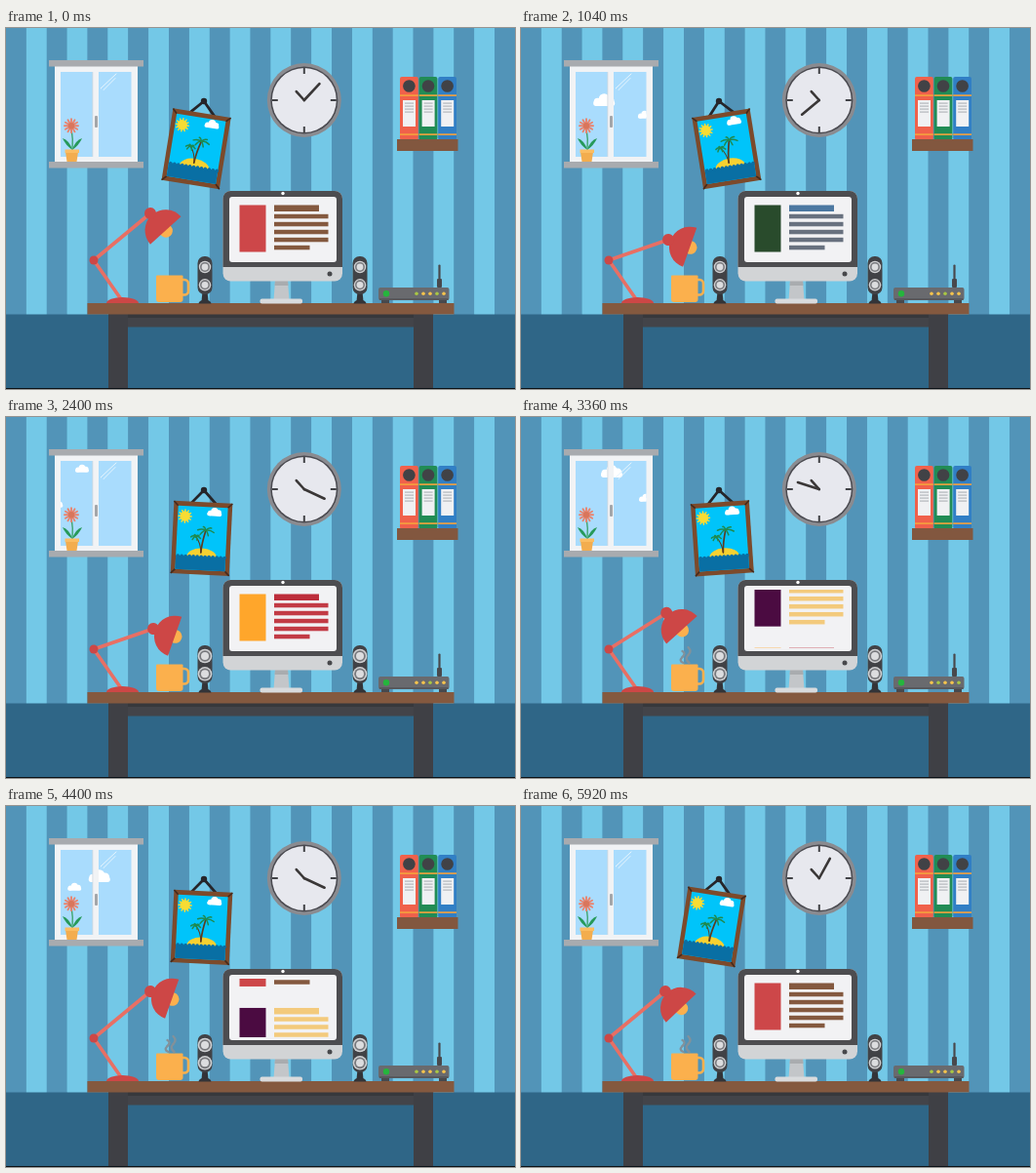
Recreate the animation shown at these times as an HTML page with a canvas. Size 522 by 370 pixels, loop 6000 ms.

```html
<!DOCTYPE html>
<html lang="en">
<head>
<meta charset="utf-8">
<title>Desk</title>
<style>
html, body { margin: 0; width: 100%; height: 100%; overflow: hidden; background: #5294b8; }
canvas { display: block; }
</style>
</head>
<body>
<canvas id="stage" width="522" height="370"></canvas>
<script>
const c = document.getElementById('stage').getContext('2d');
const LOOP = 6000, STEP = 80, SWING = 2000, TAU = Math.PI * 2, RAD = Math.PI / 180;
const DARK = '#414246', BROWN = '#84593f', RED = '#cd4746', PINK = '#e86f64';

function rect(x, y, w, h, fill) { c.fillStyle = fill; c.fillRect(x, y, w, h); }
function round(x, y, w, h, r, fill) {
  c.fillStyle = fill; c.beginPath(); c.roundRect(x, y, w, h, r); c.fill();
}
function disc(x, y, r, fill, from = 0, to = TAU) {
  c.fillStyle = fill; c.beginPath(); c.arc(x, y, r, from, to); c.fill();
}
function dome(x, y, rx, ry, fill) {
  c.fillStyle = fill; c.beginPath(); c.ellipse(x, y, rx, ry, 0, Math.PI, TAU); c.fill();
}
// Symmetric trapezoid around x
function taper(x, y, h, top, bottom, fill) {
  c.fillStyle = fill; c.beginPath();
  c.moveTo(x - top / 2, y); c.lineTo(x + top / 2, y);
  c.lineTo(x + bottom / 2, y + h); c.lineTo(x - bottom / 2, y + h);
  c.fill();
}
function line(points, color, width, cap = 'round') {
  c.strokeStyle = color; c.lineWidth = width; c.lineCap = cap; c.lineJoin = 'round';
  c.beginPath();
  points.forEach(([x, y]) => c.lineTo(x, y));
  c.stroke();
}
function curve(x0, y0, x1, y1, x2, y2, color, width) {
  c.strokeStyle = color; c.lineWidth = width; c.lineCap = 'round';
  c.beginPath(); c.moveTo(x0, y0); c.quadraticCurveTo(x1, y1, x2, y2); c.stroke();
}
function at(x, y, angle, draw) {
  c.save(); c.translate(x, y); c.rotate(angle * RAD); draw(); c.restore();
}
function clipped(x, y, w, h, draw) {
  c.save(); c.beginPath(); c.rect(x, y, w, h); c.clip(); draw(); c.restore();
}
function rays(x, y, from, to, color, width) {
  for (let i = 0; i < 12; i++) at(x, y, i * 30, () => line([[from, 0], [to, 0]], color, width));
}
// Progress from 0 to 1 between two times
const ramp = (t, a, b) => Math.min(1, Math.max(0, (t - a) / (b - a)));

function cloud(x, y, w) {
  disc(x - w * .3, y + w * .08, w * .18, '#fff');
  disc(x, y - w * .06, w * .25, '#fff');
  disc(x + w * .27, y + w * .04, w * .2, '#fff');
  round(x - w * .5, y + w * .02, w, w * .25, w * .12, '#fff');
}

function room() {
  for (let i = 0; i < 25; i++) rect(i * 20.88, 0, 21, 294, i % 2 ? '#73c8e7' : '#5294b8');
  rect(0, 293.5, 522, 77, '#2f6687');
}

// Time of passing the middle of the window, and height
const BIG_CLOUDS = [[900, 74], [3360, 56], [4450, 72]];
const SMALL_CLOUDS = [[1650, 89], [2130, 53], [3990, 83]];

function drift(t) {
  const pass = size => ([time, y]) => cloud(93 + (time - t) * .0555, y, size);
  BIG_CLOUDS.forEach(pass(22));
  SMALL_CLOUDS.forEach(pass(14));
}

function flower() {
  curve(68, 126, 69, 114, 67, 102, '#35a062', 1.3);
  for (const s of [-1, 1]) {
    c.fillStyle = '#279a5a'; c.beginPath(); c.moveTo(68, 125);
    c.quadraticCurveTo(68 + s * 3, 115, 68 + s * 10, 113);
    c.quadraticCurveTo(68 + s * 7, 120, 68, 125); c.fill();
  }
  rays(67, 100.3, 3, 7, '#e9836e', 1.9);
  disc(67, 100.3, 3.2, '#d9765c');
  taper(67.5, 127, 10, 13, 10, '#f3ad4e');
  rect(60.5, 124.5, 14.5, 3.5, '#fbbd62');
}

function windowPane(t) {
  rect(50, 39, 85, 98, '#f1f3f5');
  for (const x of [56, 95]) {
    rect(x, 45, 33.5, 87, '#a9dcfd');
    clipped(x, 45, 33.5, 87, () => drift(t));
  }
  for (const d of [0, 3]) line([[97 + d, 62 + d / 2], [113 - d / 3, 47 + d * 1.5]], '#e6f5fe', 1);
  rect(89, 39, 6, 98, '#f1f3f5');
  rect(88.5, 45, .8, 87, '#cfd8de');
  round(91, 90, 3, 12, 1, '#a3a6aa');
  for (const y of [33, 137]) rect(44, y, 97, 6.5, '#a8abaf');
  flower();
}

function clock(t) {
  c.save(); c.translate(305.8, 74);
  disc(0, 0, 38, '#8a8b90');
  disc(0, 0, 34.5, '#4a4a50');
  disc(0, 0, 33, '#e7e8ee');
  for (let i = 0; i < 4; i++) at(0, 0, i * 90, () => rect(-1, -33, 2, 6, DARK));
  at(0, 0, -42, () => line([[0, 0], [0, -12]], '#3a3737', 2.6));
  at(0, 0, 43 + t * 360 / SWING, () => line([[0, 0], [0, -23]], '#3a3737', 2.6));
  c.restore();
}

function palm(x, y, size) {
  curve(0, 64, x * .1, 54, x, y, '#5b3d22', size / 5);
  for (let i = 0; i < 6; i++) {
    const a = i * TAU / 6 + .2, dx = Math.cos(a) * size, dy = Math.sin(a) * size * .55;
    curve(x, y, x + dx * .5, y + dy * .5 - 1.5, x + dx, y + dy + 1, '#1f8a50', 1.5);
  }
}

function picture(t) {
  at(203, 75, 9.2 * Math.cos(TAU * t / SWING), () => {
    line([[-12, 13.5], [0, 0], [13, 13.5]], '#26262a', 2.8);
    rect(-30, 12.3, 60, 74.3, '#7c4a2b');
    for (const sx of [-1, 1]) for (const sy of [-1, 1]) {
      at(0, 49.5, 0, () => line([[sx * 30, sy * 37], [sx * 25.5, sy * 32.5]], '#45291a', 1.6, 'butt'));
    }
    rect(-25.5, 17, 51, 65, '#00c4fa');
    rays(-18, 27.5, 4, 6.6, '#f6da38', 1.5);
    disc(-18, 27.5, 5.2, '#f8dc33');
    cloud(12, 22, 15);
    dome(1, 69, 15.5, 9.5, '#f7d130');
    rect(-25.5, 68, 51, 14, '#096fa4');
    for (let x = -23.5; x < 25; x += 4) disc(x, 68.3, 1.8, '#096fa4');
    palm(4, 41, 8.5);
    palm(-6, 48, 5);
  });
  disc(203, 75, 3.2, '#26262a');
}

function binders() {
  ['#f0614b', '#218c55', '#317fc5'].forEach((color, i) => {
    const x = 404 + i * 19.6;
    round(x, 50, 18.8, 65, 2, color);
    disc(x + 9.4, 59.5, 6.3, DARK);
    for (const y of [68.3, 108.3]) rect(x, y, 18.8, 1.6, '#f6a33e');
    rect(x + 3, 74, 13, 27, '#f0f1f3');
    for (let y = 76.5; y < 88; y += 3) rect(x + 5, y, 9, 1.2, '#b4b7bc');
  });
  rect(401, 114, 62.5, 12, '#82573f');
}

// picture colour, title colour, text colour
const PAGES = [['#cd4749', BROWN, BROWN], ['#294b2c', '#4c78a1', '#68717f'],
  ['#ffa62b', '#bd2d3b', '#c23b45'], ['#4b0b41', '#f3ca7c', '#f3ca7c']];
const PAGE_TIME = 1320, PAGE_GAP = 70;

function page(y, [image, title, text]) {
  rect(239.5, y, 27, 48, image);
  rect(275, y, 46, 6.5, title);
  for (let i = 0; i < 5; i++) rect(275, y + 9.3 + i * 8, i < 4 ? 55.5 : 36.5, 4.5, text);
}

// Each page slides in for half its time, then rests
function scroll(t) {
  const turn = Math.max(0, (t - 200) / PAGE_TIME), n = Math.floor(turn);
  return Math.min(PAGES.length, n + Math.min(1, (turn - n) * 2));
}

function computer(t) {
  taper(282.5, 259, 20, 13, 16, '#c3c6c9');
  taper(282.5, 259, 5, 13, 14, '#a9acaf');
  round(260.5, 277.5, 43.5, 5, 2, '#d9dbdd');
  round(222.5, 167, 122.5, 92.5, 8, '#d2d4d6');
  round(222.5, 167, 122.5, 78, [8, 8, 0, 0], '#4d4d50');
  round(229, 173, 110, 67, 3, '#f2f2f4');
  disc(284, 169.5, 1.7, '#fff');
  disc(332, 252, 2.5, '#47484b');
  const u = scroll(t);
  clipped(229, 177, 110, 60, () => {
    for (let i = 0; i <= PAGES.length; i++) page(181.5 + PAGE_GAP * (u - i), PAGES[i % PAGES.length]);
  });
}

function speaker(x, t) {
  const r = 6.8 - .6 * Math.cos(TAU * t / 1000);
  taper(x, 270, 10, 5, 7, '#333438');
  dome(x, 282.5, 6.5, 4, '#333438');
  round(x - 7.5, 234, 15, 39, 7, DARK);
  for (const y of [245, 263.3]) {
    disc(x, y, r, '#d0d1d3');
    disc(x, y, r * .8, '#77787c');
    disc(x, y, r * .55, '#dcdddf');
  }
}

function lamp(t) {
  const drop = ramp(t, 0, 1040) - ramp(t, 2400, 4000);
  const tilt = ramp(t, 0, 1040) - ramp(t, 2400, 3360) + ramp(t, 3360, 4400) - ramp(t, 4400, LOOP);
  const x = 148 + 3 * drop, y = 190 + 27 * drop;
  line([[118, 278], [90, 238], [x, y]], PINK, 3.6);
  disc(90, 238, 4.5, RED);
  dome(119.5, 282, 16.5, 6, RED);
  at(x, y, 48 - 28.5 * tilt, () => {
    disc(24, 0, 6.8, '#fbb04e');
    disc(23.5, 0, 21.2, RED, Math.PI / 2, Math.PI * 1.5);
    disc(0, 0, 6, RED);
  });
}

function mug(t) {
  c.strokeStyle = '#fbb04d'; c.lineWidth = 2.6;
  c.beginPath(); c.roundRect(176, 258, 11, 15.5, 4); c.stroke();
  round(154, 253.5, 27.5, 27.5, [1, 1, 3, 3], '#fbb04d');
  c.globalAlpha = ramp(t, 2700, 3100);
  for (const s of [0, 1]) {
    const x = 165.5 + s * 6, top = 240 - s * 4, mid = (top + 252) / 2;
    curve(x + 1, 252, x - 4, mid + 4, x, mid, '#83919a', 2.3);
    curve(x, mid, x + 4, mid - 4, x, top, '#83919a', 2.3);
  }
  c.globalAlpha = 1;
}

function router(t) {
  const beat = Math.floor(t / 240);
  line([[444.5, 243.5], [444.5, 264]], '#48494d', 2.2);
  round(442, 257, 5, 9, 1, '#48494d');
  for (const x of [385, 444]) rect(x, 278, 8, 4, '#48494d');
  round(382, 266, 72.5, 13, 2, '#696a6e');
  rect(383, 277, 70.5, 2, '#57585c');
  disc(390, 272.3, 3.2, beat % 2 ? '#2d9140' : '#25b53d');
  for (let i = 0; i < 5; i++) disc(421 + i * 7, 272.3, 1.8, (beat + i) % 3 ? '#f4c34d' : '#a9c744');
}

function desk() {
  rect(105, 293, 333, 13.5, '#434449');
  rect(105, 293, 333, 4, '#37383c');
  for (const x of [105, 418]) rect(x, 293, 20, 77, '#3f4045');
  rect(83.5, 282, 376, 11.5, BROWN);
  rect(0, 369, 522, 1, '#0b1116');
}

function draw(t) {
  room();
  windowPane(t);
  clock(t);
  picture(t);
  binders();
  desk();
  computer(t);
  speaker(204, t);
  speaker(363, t);
  lamp(t);
  mug(t);
  router(t);
}

const start = performance.now();
function tick() {
  const t = (performance.now() - start) % LOOP;
  draw(Math.floor(t / STEP) * STEP);
  requestAnimationFrame(tick);
}
tick();
</script>
</body>
</html>
```
